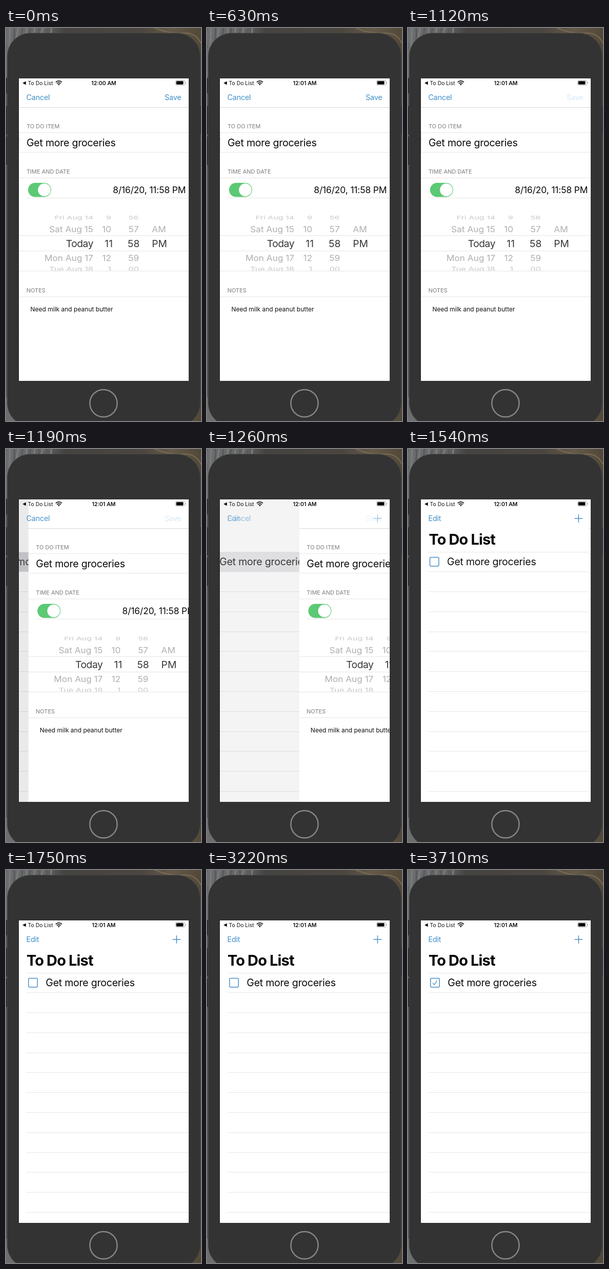
These frames come from a looping animation (380 by 764 pixels, 4.55 s). An HTML page:

```html
<!DOCTYPE html>
<html lang="en">
<head>
<meta charset="utf-8">
<title>To do list</title>
<style>
  html, body { margin: 0; width: 100%; height: 100%; overflow: hidden; background: #333; }
  svg { display: block; width: 380px; height: 764px; }
  text { font-family: Inter, Roboto, "Liberation Sans", sans-serif; font-optical-sizing: none; white-space: pre; }
  .nav { font-size: 14.5px; letter-spacing: -.3px; fill: #4190c9; }
  .head { font-size: 11px; fill: #7c7c80; }
  .item { font-size: 19.6px; letter-spacing: -.27px; fill: #0a0a0a; }
  .date { font-size: 17.4px; letter-spacing: -.12px; fill: #0a0a0a; }
  .note { font-size: 12px; fill: #111; }
  .title { font-size: 29px; font-weight: 700; letter-spacing: -.88px; fill: #000; }
  .back { font-size: 10.4px; fill: #111; }
  .clock { font-size: 10.6px; font-weight: 600; fill: #111; }
  .end { text-anchor: end; }
  .mid { text-anchor: middle; }
  .rule { stroke: #e6e6e8; fill: none; }
  .blue { stroke: #4a8ec8; fill: none; stroke-width: 1.5; }
</style>
</head>
<body>
<svg viewBox="0 0 380 764">
  <defs>
    <linearGradient id="wall">
      <stop offset="0" stop-color="#6c6e6f"/>
      <stop offset=".2" stop-color="#646464"/>
      <stop offset=".3" stop-color="#454341"/>
      <stop offset=".7" stop-color="#4b463f"/>
      <stop offset=".85" stop-color="#655a48"/>
      <stop offset="1" stop-color="#524838"/>
    </linearGradient>
    <clipPath id="screen"><rect x="25" y="98" width="331" height="588"/></clipPath>
    <clipPath id="wheel"><rect x="26" y="364" width="331" height="108"/></clipPath>
  </defs>

  <rect width="380" height="764" fill="url(#wall)"/>
  <g id="drapes" fill="none" stroke-width="3"></g>
  <rect y="97" width="6" height="620" fill="#555"/>
  <path d="M290 0q30 12 55 10T380 30" fill="none" stroke="#786b55" stroke-width="2"/>
  <path d="M1 97v30M1 152v55M1 211v55M379 152v54" stroke="#2d2d2d" stroke-width="4"/>
  <rect x="2.5" y="10" width="376" height="764" rx="45" fill="#333" stroke="#464646" stroke-width=".8"/>
  <path d="M24.5 98v588" stroke="#181818"/>
  <circle cx="190" cy="729.5" r="26.6" fill="none" stroke="#868686" stroke-width="2.5"/>

  <g clip-path="url(#screen)">
    <rect x="25" y="97" width="332" height="590" fill="#fff"/>
    <g id="list">
      <rect id="glow" x="25" y="201" width="432" height="38" fill="#d1d1d6"/>
      <path id="rows" class="rule"/>
      <rect class="blue" x="43.9" y="210.6" width="17.4" height="17.2" rx="2.2"/>
      <path id="check" class="blue" d="M48.2 219.4l3 3.8 5.2-8.6" style="stroke-width:1.3"/>
      <text id="label" class="item" x="77.3" y="226">Get more groceries</text>
    </g>
    <text id="title" class="title" x="40" y="186">To Do List</text>
    <rect id="dim" x="25" y="97" width="332" height="590"/>

    <g id="form">
      <rect x="25.5" y="97" width="332" height="590" fill="#fff"/>
      <path class="rule" style="stroke:#d6d6d8" d="M25.5 154.5h332"/>
      <path id="fields" class="rule"/>
      <path class="rule" d="M40 330.5h317"/>
      <text class="head" x="40" y="194.5">TO DO ITEM</text>
      <text class="item" x="40" y="230">Get more groceries</text>
      <text class="head" x="40" y="283">TIME AND DATE</text>
      <rect x="43" y="301" width="45" height="27.4" rx="13.7" fill="#5cc974"/>
      <circle cx="74.6" cy="314.7" r="12.4" fill="#fff"/>
      <text class="date end" x="350.4" y="320.7">8/16/20, 11:58 PM</text>
      <g id="picker" clip-path="url(#wheel)"></g>
      <text class="head" x="39.7" y="513.6">NOTES</text>
      <text class="note" x="47.5" y="551">Need milk and peanut butter</text>
    </g>

    <text id="cancel" class="nav" x="39.5" y="140.4">Cancel</text>
    <text id="edit" class="nav" x="39.5" y="140.4">Edit</text>
    <text id="save" class="nav end" x="341.4" y="140.4">Save</text>
    <path id="plus" class="blue" d="M324.6 135h15.6M332.4 127.2v15.6"/>

    <path d="M38.8 103.4v7l-6.6-3.5z" fill="#111"/>
    <text class="back" x="42.6" y="110.8">To Do List</text>
    <g fill="none" stroke="#111" stroke-width="1.8">
      <path d="M96.9 105.4a8.6 8.6 0 0 1 12 0M99.1 107.9a5.4 5.4 0 0 1 7.6 0"/>
      <path d="M102.9 111.6l-2-2.2a3 3 0 0 1 4 0z" fill="#111" stroke="none"/>
    </g>
    <text id="clock" class="clock mid" x="190.6" y="110.8"></text>
    <rect x="330.4" y="101.9" width="18.4" height="9.2" rx="2.6" fill="none" stroke="#999" stroke-width=".8"/>
    <rect x="331.8" y="103.2" width="13.8" height="6.6" rx="1.4" fill="#000"/>
    <path d="M350 105v3" stroke="#999"/>
  </g>
</svg>

<script>
const LOOP = 4550, STEP = 70, WIDTH = 331;
const SLIDE_START = 1168, SLIDE_END = 1750, STIFFNESS = 0.0171;
const $ = id => document.getElementById(id);
const clamp = v => Math.max(0, Math.min(1, v));
const fade = (id, v) => $(id).setAttribute('opacity', v.toFixed(3));
const shift = (id, x) => $(id).setAttribute('transform', `translate(${x.toFixed(2)} 0)`);

function buildScene() {
  $('drapes').innerHTML = Array.from({ length: 12 }, (_, i) =>
    `<path d="M${i * 8} 0q${i % 3 * 3 - 4} 14 ${-i * 1.5} 40" stroke="${i % 2 ? '#7a7c7d' : '#585a5b'}"/>`).join('');

  $('rows').setAttribute('d', Array.from({ length: 13 }, (_, k) =>
    `M40 ${Math.floor(200.1 + 38.77 * k) + .5}h420`).join(''));
  $('fields').setAttribute('d', [203, 241, 291, 403, 433, 472, 522].map(y => `M25.5 ${y + .5}h332`).join(''));

  // baseline, size, vertical squash, colour, then the four columns
  const wheelRows = [
    [372.3, 16, .6, '#c8c8c8', 'Fri Aug 14', '9', '56', ''],
    [396.7, 17.2, .94, '#afafb1', 'Sat Aug 15', '10', '57', 'AM'],
    [426, 19.3, 1, '#383838', 'Today', '11', '58', 'PM'],
    [452.8, 17.2, .94, '#afafb1', 'Mon Aug 17', '12', '59', ''],
    [473, 16.4, .68, '#c8c8c8', 'Tue Aug 18', '1', '00', '']
  ];
  const columns = [[170, 'end'], [0, 'end'], [248.8, 'mid'], [284.3, '']];
  $('picker').innerHTML = wheelRows.map(([y, size, squash, color, ...cells]) =>
    cells.map((cell, i) => {
      const x = i === 1 ? (size > 18 ? 208 : 205) : columns[i][0];
      const tight = cell === 'Today' ? -.5 : 0;
      return `<text class="${columns[i][1]}" transform="translate(${x} ${y}) scale(1 ${squash})" ` +
        `font-size="${size}" fill="${color}" letter-spacing="${tight}">${cell}</text>`;
    }).join('')).join('');
}

// critically damped spring, 0 to 1
function slide(t) {
  if (t <= SLIDE_START) return 0;
  if (t >= SLIDE_END) return 1;
  const x = (t - SLIDE_START) * STIFFNESS;
  return 1 - (1 + x) * Math.exp(-x);
}

function draw(t) {
  const p = slide(t), rest = 1 - p;
  const shade = clamp((rest - .1) / .9);
  $('clock').textContent = t < 140 ? '12:00 AM' : '12:01 AM';
  shift('form', WIDTH * p);
  shift('list', -.3 * WIDTH * rest);
  shift('title', 33 * rest);
  fade('title', clamp((p - .65) / .35));
  fade('label', 1 - .3 * Math.sqrt(rest));
  fade('dim', .09 * shade);
  fade('glow', shade);
  fade('cancel', rest);
  fade('edit', p);
  fade('plus', p);
  fade('save', (t < 910 ? 1 : .2) * rest);
  fade('check', clamp((t - 3360) / 280));
}

function tick() {
  draw(Math.floor((performance.now() - start) % LOOP / STEP) * STEP);
  requestAnimationFrame(tick);
}

buildScene();
const start = performance.now();
tick();
</script>
</body>
</html>
```
